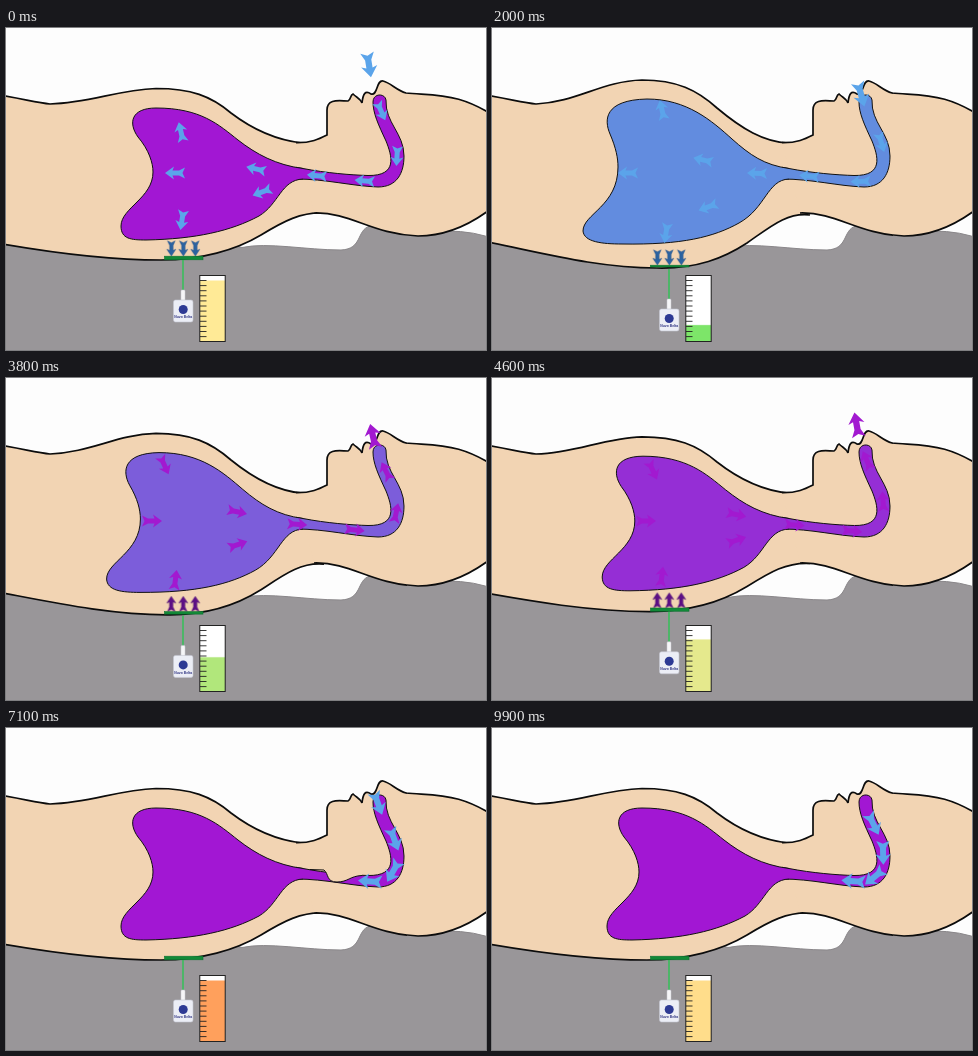
An HTML page for the animation above (10000 ms loop, 480 by 322 pixels).

```html
<!DOCTYPE html>
<html lang="en">
<head>
<meta charset="utf-8">
<title>Breathing and airway obstruction</title>
<style>
  html, body { margin: 0; width: 100%; height: 100%; overflow: hidden; background: #fdfdfd; }
  svg { display: block; width: 480px; height: 322px; }

  .bed { fill: #999699; stroke: #8a878a; }
  .skin { fill: #f2d4b3; }
  .torso, .head { fill: #f2d4b3; stroke: #0c0c0c; stroke-width: 1.7; }
  .air { stroke: #111; animation: air 10s steps(20) infinite; }
  .edge { fill: none; stroke: #111; }
  .torso { animation: torso 10s steps(20) infinite; }
  .lungs { animation: air 10s steps(20) infinite, lungs 10s steps(20) infinite; }
  .ride { animation: ride 10s steps(20) infinite; }
  .pad { fill: #128a38; stroke: #0d7030; stroke-width: .6; animation: thin 10s steps(20) infinite; }
  .level {
    transform-box: fill-box; transform-origin: bottom;
    animation: level 10s steps(20) infinite, alert 10s steps(20) infinite;
  }
  .label { font: bold 3.4px Arial, "Liberation Sans", sans-serif; fill: #2c3180; text-anchor: middle; }

  #tongue { animation: tongue 10s steps(10) infinite; }
  #inhale { fill: #5ba4ea; animation: show-inhale 10s steps(10) infinite; }
  #exhale { fill: #a219d0; animation: show-exhale 10s steps(10) infinite; }
  #blocked { fill: #5ba4ea; animation: show-blocked 10s steps(10) infinite; }
  #inhale .ride { fill: #2b62a0; stroke: #1d4a80; stroke-width: .5; }
  #exhale .ride { fill: #5d0f86; stroke: #420a62; stroke-width: .5; }
  .flow { animation: 10s steps(20) infinite; }
  #inhale .flow { animation-name: move-in; }
  #exhale .flow { animation-name: move-out; }
  #blocked .flow { animation-name: move-blocked; }

  @keyframes torso {
    0%, 50%, 100% { d: path("M296 115C270 112 246 101 225 85C205 68 185 60.5 150 60.5C110 62 85 75 44 76C30 75 15 70 -20 65V213C40 224 100 232 155 232C195 232 230 222 255 207C278 193 295 184 318 185"); }
    20%, 30% { d: path("M296 115C272 114 250 101 225 80C205 62 185 52 150 52C110 53 85 74 44 76C30 75 15 70 -20 65V211C40 222 100 240 165 240C205 241 232 230 255 215C278 199 295 184 318 187"); }
  }
  @keyframes lungs {
    0%, 50%, 100% { d: path("M297 140.5C270 137 250 126 232 112C213 97 195 80 150 80C125 80 122 95 132 109C143 122 147 135 147 144C147 170 115 180 115 198C115 211 125 212 140 212C190 211 225 203 253 188C273 176 275 152 297 151"); }
    20%, 30% { d: path("M297 140.5C272 137 258 127 240 111C220 93 195 71 155 71C112 72 112 92 118 106C124 120 126 130 126 139C126 178 91 186 91 203C92 214 110 216 130 216C190 217 222 209 247 195C274 180 275 152 297 151"); }
  }
  @keyframes air {
    0%, 50%, 100% { fill: #a217d3; }
    20%, 30% { fill: #628cdf; }
  }
  @keyframes ride { 20%, 30% { transform: translateY(9px); } 0%, 50%, 100% { transform: translateY(0); } }
  @keyframes thin { 20%, 30% { height: 1.8px; } 0%, 50%, 100% { height: 3.6px; } }
  @keyframes level { 20%, 30% { transform: scaleY(.27); } 0%, 50%, 100% { transform: scaleY(1); } }
  @keyframes alert {
    0%, 50%, 60%, 100% { fill: #ffea96; }
    20%, 30% { fill: #7de569; }
    80%, 90% { fill: #ff642c; }
  }
  @keyframes tongue { 0%, 50%, 99%, 100% { opacity: 0; } 60%, 90% { opacity: 1; } }
  @keyframes show-inhale { 0%, 20% { opacity: 1; } 30%, 100% { opacity: 0; } }
  @keyframes show-exhale { 0%, 20%, 60%, 100% { opacity: 0; } 30%, 50% { opacity: 1; } }
  @keyframes show-blocked { 0%, 50% { opacity: 0; } 60%, 100% { opacity: 1; } }
  @keyframes move-in { 0% { offset-distance: var(--from); } 20%, 100% { offset-distance: var(--to); } }
  @keyframes move-out { 0%, 30% { offset-distance: var(--from); } 50%, 100% { offset-distance: var(--to); } }
  @keyframes move-blocked { 0%, 60% { offset-distance: var(--from); } 80%, 100% { offset-distance: var(--to); } }
</style>
</head>
<body>
<svg viewBox="0 0 480 322">
  <rect width="480" height="322" fill="#fdfdfd"/>
  <path class="bed" d="M-5 190L215 214L236 219.5C262 214 300 222 335 222C357 221 350 202 364 198C395 195 410 206 440 203Q470 203 490 212V330H-5Z"/>
  <path class="torso"/>
  <path class="head" d="M290 114.700C305 115 313 111 321 107V82C321 70 334 73 342 73C345 72 344 67 347 66C351 70 354 70 356 75C357 66 359 62 365 66C372 68 370 52 377 53C385 55 390 62 400 65C430 68 455 63 500 96V168C470 196 440 208 412 208C365 206 345 184 308 185"/>
  <path class="air" d="M290 139.300L297 140.500C320 145 345 147 362 147.500C392 148 386 128 380 113C372 96 367 85 367 74C367 65 379 65 380 72C379 95 398 105 398 128C398 145 391 159 372 159C345 158 320 151 290 151"/>
  <path class="air lungs"/>
  <g id="tongue">
    <path class="skin" d="M318 142C323 146 320 154 331 154C342 154 344 148 356 147.500V145L318 141Z"/>
    <path class="edge" d="M304 141.500L318 142C323 146 320 154 331 154C342 154 344 148 356 147.500"/>
  </g>
  <g id="inhale"></g>
  <g id="exhale"></g>
  <g id="blocked"></g>
  <g class="ride">
    <rect class="pad" x="158.500" y="228.200" width="38.500"/>
    <path d="M177 232V263" stroke="#35bf58" stroke-width="1.500"/>
    <rect x="175" y="262" width="4" height="11" rx="1" fill="#f6f6f8" stroke="#c9c9d2" stroke-width=".5"/>
    <rect x="167.500" y="272" width="19.500" height="22" rx="2" fill="#eceef6" stroke="#c4c6d2" stroke-width=".6"/>
    <circle cx="177.200" cy="281.500" r="4.500" fill="#2d3a94"/>
    <text class="label" x="177.200" y="290.300">Nuvo Belta</text>
  </g>
  <rect x="194" y="247.500" width="25" height="66" fill="#fff"/>
  <rect class="level" x="194" y="252.500" width="25" height="61"/>
  <path id="ticks" stroke="#222" stroke-width=".9"/>
  <rect x="193.800" y="247.500" width="25.400" height="66" fill="none" stroke="#222"/>
</svg>
<script>
const ARROW = 'M10 0L1 -6.5L2.500 -2.500H-4L-10 -5.500L-7.500 0L-10 5.500L-4 2.500H2.500L1 6.500Z';
const AIRWAY = 'M363 37C367 62 370 72 376 85C385 104 392 115 391 128C390 145 382 154 366 153.500C340 152 322 146 250 145';

function addArrow(parent) {
  const arrow = document.createElementNS('http://www.w3.org/2000/svg', 'path');
  arrow.setAttribute('d', ARROW);
  parent.append(arrow);
  return arrow;
}

// One arrow that travels along a path between two distances
function addFlow(id, path, from, to, { size = 1, turn = 'auto' } = {}) {
  const arrow = addArrow(document.getElementById(id));
  arrow.setAttribute('class', 'flow');
  arrow.style.cssText = `offset-path: path("${path}"); offset-rotate: ${turn};
    transform: scale(${size}); --from: ${from}; --to: ${to}`;
}

// Arrows in the airway, counted from the mouth
for (let i = 0; i < 5; i++) {
  const size = i ? 1 : 1.25;
  const out = 33 + 34 * i + 3.4 * i * i;
  addFlow('inhale', AIRWAY, `${48 * i}px`, `${30 + 52 * i}px`, { size });
  addFlow('exhale', AIRWAY, `${out}px`, `${out - 29}px`, { size, turn: 'reverse' });
}

// With the throat blocked the arrows pile up instead
for (let i = 0; i < 4; i++) {
  const from = 12 + 54 * i - 4.3 * i * i;
  const to = 62 + 33 * i - 2.2 * i * i;
  addFlow('blocked', AIRWAY, `${from}px`, `${to}px`, { size: 1.2 });
}

// Short straight moves inside the lungs
const spread = ['M250 141l-39 -9', 'M256 164l-40 15', 'M169 145h-33', 'M175 104l-5 -22', 'M176 192l-2 13'];
const gather = ['M218 131l33 7', 'M219 171l32 -11', 'M138 143h20', 'M156 82l6 13', 'M169 205l1 -8'];
spread.forEach(path => addFlow('inhale', path, '0%', '100%'));
gather.forEach(path => addFlow('exhale', path, '0%', '100%'));

// Pressure arrows between lung and sensor
for (const [id, angle] of [['inhale', 90], ['exhale', -90]]) {
  for (let i = 0; i < 3; i++) {
    const ride = document.createElementNS('http://www.w3.org/2000/svg', 'g');
    ride.setAttribute('class', 'ride');
    document.getElementById(id).append(ride);
    addArrow(ride).setAttribute('transform', `translate(${165.3 + 12 * i} 220.500) rotate(${angle}) scale(.76 .7)`);
  }
}

let ticks = '';
for (let i = 0; i < 12; i++) ticks += `M194 ${252.5 + i * 5.1}h6.500`;
document.getElementById('ticks').setAttribute('d', ticks);
</script>
</body>
</html>
```
